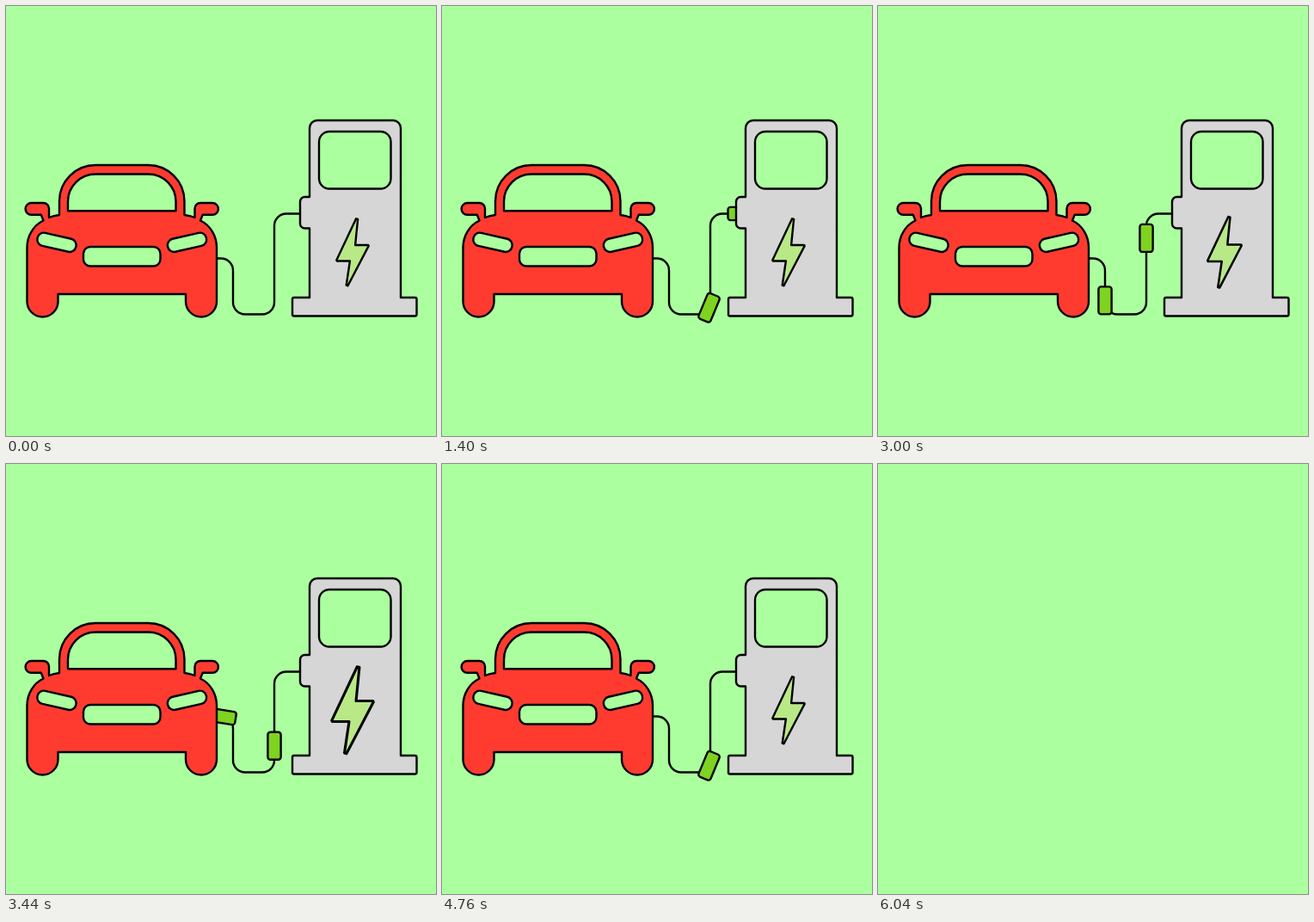
Recreate the animation shown at these times as an HTML page with a canvas. Size 500 by 500 pixels, loop 6.08 s.

```html
<!DOCTYPE html>
<html lang="en">
<head>
<meta charset="utf-8">
<title>Charging car</title>
<style>
  html, body { margin: 0; width: 100%; height: 100%; overflow: hidden; background: #abff9e; }
  canvas { display: block; width: 500px; height: 500px; }
</style>
</head>
<body>
<canvas id="stage"></canvas>
<script>
const SIZE = 500, LOOP = 6080, STEP = 40;
const START = 280, BLANK = 6040;
const CYCLE = 1120, BEAT = CYCLE / 2, CHARGES = 4, TRIP = 2 * CYCLE;
const BG = '#abff9e', RED = '#ff3b30', GREY = '#d6d6d6', BOLT = '#b8e986', CHARGE = '#7ed321';
const LINE = 2.4;
const CAR_MIDDLE = 134.75;

const canvas = document.getElementById('stage');
const ctx = canvas.getContext('2d');
const ratio = window.devicePixelRatio || 1;
canvas.width = canvas.height = SIZE * ratio;

// The cable runs from inside the pump to behind the car
const CABLE = `M352 241.5 H326 a14 14 0 0 0 -14 14 V344.5 a14 14 0 0 1 -14 14
  H278 a14 14 0 0 1 -14 -14 V307.5 a14 14 0 0 0 -14 -14 H208`;
const track = document.createElementNS('http://www.w3.org/2000/svg', 'path');
track.setAttribute('d', CABLE);
const cable = new Path2D(CABLE);

function box(x, y, w, h, r) {
  const path = new Path2D();
  path.roundRect(x, y, w, h, r);
  return path;
}

const centredBox = (w, h, r) => box(-w / 2, -h / 2, w, h, r);

const carBody = new Path2D(`
  M24.5 343.5 V281 C24.5 267 32 255 43.5 249.5 L40.8 242.8 H29.5
  A6.9 6.9 0 0 1 29.5 229 H43.5 A6.5 6.5 0 0 1 50 235.5 V246 Q55.5 243.7 62 243
  V227 A42 42 0 0 1 104 185 H165.5 A42 42 0 0 1 207.5 227
  V243 Q214 243.7 219.5 246 V235.5 A6.5 6.5 0 0 1 226 229 H240
  A6.9 6.9 0 0 1 240 242.8 H228.7 L226 249.5 C237.5 255 245 267 245 281
  V343.5 A18 18 0 0 1 209 343.5 V335 H60.5 V343.5 A18 18 0 0 1 24.5 343.5 Z`);
const windscreen = new Path2D(`
  M72 238.2 V227.5 A32 32 0 0 1 104 195.5 H165.5 A32 32 0 0 1 197.5 227.5 V238.2 Z`);
const grille = box(90, 280, 89.5, 22.5, 8);
const headlight = centredBox(46, 15.4, 7.5);

const pumpBody = new Path2D(`
  M353 339 V258.5 H347.5 A5.5 5.5 0 0 1 342 253 V227.5 A5.5 5.5 0 0 1 347.5 222
  H353 V142 A9 9 0 0 1 362 133 H450 A9 9 0 0 1 459 142 V339
  H475.5 A2 2 0 0 1 477.5 341 V358.5 A2 2 0 0 1 475.5 360.5
  H335 A2 2 0 0 1 333 358.5 V341 A2 2 0 0 1 335 339 Z`);
const screen = box(364, 146, 83.5, 66.5, 12);
const bolt = new Path2D(`
  M4.1 -39 L-18.7 9.3 L-18.2 10.2 H-3.1 L-7.3 38.4 L-5.5 39
  L18.7 -7.4 L18.2 -8.3 H3.1 L6.1 -38.4 Z`);
const charge = centredBox(32, 15.2, 3);

function paint(path, fill, width = LINE) {
  ctx.fillStyle = fill;
  ctx.lineWidth = width;
  ctx.fill(path);
  ctx.stroke(path);
}

function placed(x, y, angle, scale, draw) {
  ctx.save();
  ctx.translate(x, y);
  ctx.rotate(angle);
  ctx.scale(scale, scale);
  draw();
  ctx.restore();
}

function drawCar() {
  paint(carBody, RED);
  paint(windscreen, BG);
  paint(grille, BG);
  for (const side of [-1, 1]) {
    placed(CAR_MIDDLE + side * 75.75, 274.8, -side * 0.225, 1, () => paint(headlight, BG));
  }
}

// Grows for half a beat and shrinks for the other half
function boltScale(time) {
  const part = time % BEAT / (BEAT / 2);
  const x = (part % 1) ** 0.77;
  const eased = x * x * (3 - 2 * x);
  return 1 + 0.44 * (part < 1 ? eased : 1 - eased);
}

function drawPump(time) {
  paint(pumpBody, GREY);
  paint(screen, BG);
  placed(403, 286.3, 0, boltScale(time), () => paint(bolt, BOLT));
}

// Near-even speed with a surge that fades along the way
function travelled(age) {
  const surge = 3.2 * (1 - age / TRIP) * Math.sin(2 * Math.PI * age / CYCLE);
  return 3.5 + 0.125 * age - surge;
}

function drawCharges(time) {
  for (let i = 0; i < CHARGES; i++) {
    const age = time - i * CYCLE;
    if (age < 0 || age > TRIP) continue;
    const distance = travelled(age);
    const { x, y } = track.getPointAtLength(distance);
    const back = track.getPointAtLength(distance - 2);
    placed(x, y, Math.atan2(y - back.y, x - back.x), 1, () => paint(charge, CHARGE));
  }
}

function render(now) {
  const t = Math.floor(now % LOOP / STEP) * STEP;
  ctx.setTransform(ratio, 0, 0, ratio, 0, 0);
  ctx.fillStyle = BG;
  ctx.fillRect(0, 0, SIZE, SIZE);
  if (t >= BLANK) return;
  const time = Math.min(Math.max(t - START, 0), 5 * CYCLE);
  ctx.strokeStyle = '#000';
  ctx.lineJoin = 'round';
  ctx.lineWidth = LINE;
  ctx.stroke(cable);
  if (t >= START) drawCharges(time);
  drawCar();
  drawPump(time);
}

let origin;
function tick(now) {
  origin ??= now;
  render(now - origin);
  requestAnimationFrame(tick);
}
render(0);
requestAnimationFrame(tick);
</script>
</body>
</html>
```
